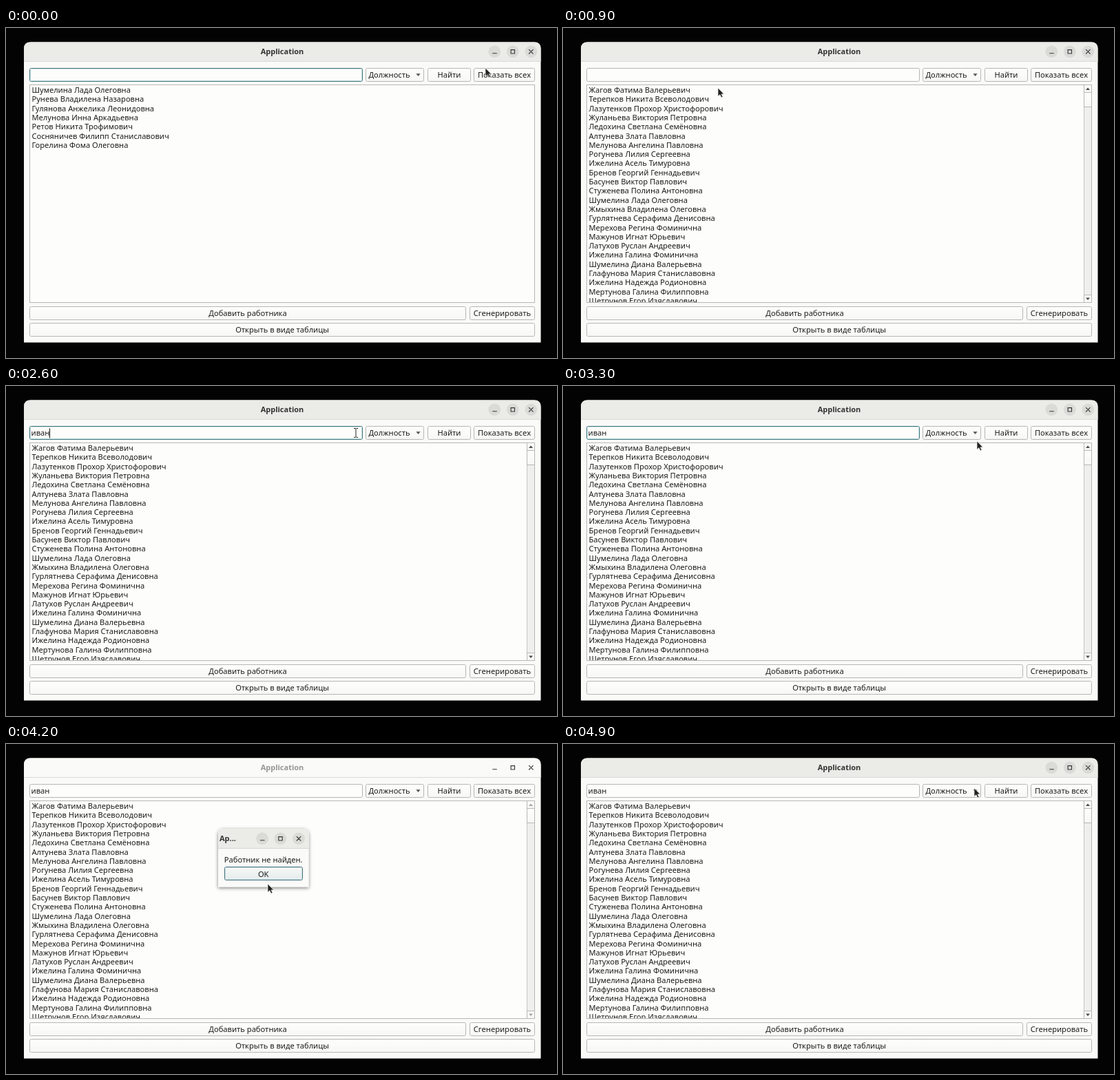
An HTML page for the animation above (5 s loop, 800 by 479 pixels).

```html
<!DOCTYPE html>
<html lang="ru">
<head>
<meta charset="utf-8">
<title>Application</title>
<style>
  html, body { margin: 0; width: 100%; height: 100%; overflow: hidden; background: #030303; }
  svg { display: block; width: 800px; height: 479px; }
  text { font: 11.1px "Noto Sans", "Open Sans", sans-serif; fill: #1c1c1c; white-space: pre; }
  .title { font-size: 11px; font-weight: 700; fill: #333331; }
  .mid { text-anchor: middle; }
  .frame { fill: #fdfdfb; stroke: #b7b8b5; }
  .btn { fill: url(#face); stroke: #b7b8b5; }
  .focus { stroke: #3f7680; }
  .glow { fill: none; stroke: #cfe3e5; }
  .icon { fill: none; stroke: #343432; stroke-width: 1.1; }
  .disc { fill: #dadad7; }
  .off { display: none; }
</style>
</head>
<body>
<svg viewBox="0 0 800 479">
  <defs>
    <linearGradient id="face" x2="0" y2="1">
      <stop offset="0" stop-color="#fefefd"/><stop offset="1" stop-color="#f7f7f5"/>
    </linearGradient>
    <linearGradient id="okFace" x2="0" y2="1">
      <stop offset="0" stop-color="#f7f9f8"/><stop offset="1" stop-color="#e4ebea"/>
    </linearGradient>
    <filter id="shadow" x="-20%" y="-20%" width="140%" height="150%">
      <feDropShadow dx="0" dy="1.5" stdDeviation="2.6" flood-color="#000" flood-opacity=".5"/>
    </filter>
    <clipPath id="listClip"><rect x="35" y="83" width="732" height="315"/></clipPath>
    <g id="controls">
      <g class="discs">
        <circle class="disc" r="8.8" cx="-53"/><circle class="disc" r="8.8" cx="-26.5"/><circle class="disc" r="8.8"/>
      </g>
      <path class="icon" d="M-56 2.5h6.5M-29.2-2.7h5.4v5.4h-5.4zM-3.2-3.2l6.4 6.4M3.2-3.2l-6.4 6.4"/>
    </g>
  </defs>

  <rect width="800" height="479" fill="#030303"/>
  <path d="M26 456.5V30q0-9.5 9.5-9.5h731.500q9.500 0 9.500 9.500v426.500z" fill="#fafaf8"/>
  <path id="bar" d="M26 48.500V30q0-9.500 9.500-9.500h731.500q9.500 0 9.500 9.500v18.500z"/>
  <path d="M26 48.500h750.500" stroke="#dadad7"/>
  <text id="caption" class="title mid" x="401" y="38">Application</text>
  <use id="mainControls" href="#controls" x="762.300" y="34.300"/>

  <rect id="field" class="frame" x="34.500" y="58.500" width="483" height="19" rx="2"/>
  <rect id="fieldGlow" class="glow" x="35.500" y="59.500" width="481" height="17" rx="1"/>
  <text id="typed" x="36.500" y="72"></text>
  <path id="caret" d="M0 61.500v14" stroke="#111"/>

  <g id="buttons"></g>
  <path d="M595.300 66.300h6.400l-3.200 3.600z" fill="#555553"/>

  <rect class="frame" x="34.500" y="82.500" width="733" height="316"/>
  <g id="found" clip-path="url(#listClip)"></g>
  <g id="all">
    <g clip-path="url(#listClip)"></g>
    <rect x="756.500" y="83" width="10.500" height="315" fill="#efefed"/>
    <path d="M756.500 83v315" stroke="#c6c7c4"/>
    <rect class="btn" x="756.500" y="82.500" width="11" height="11"/>
    <rect class="btn" x="756.500" y="93.500" width="11" height="21"/>
    <rect class="btn" x="756.500" y="387.500" width="11" height="11"/>
    <path id="arrows" d="M759 90h6l-3-3.500zM759 391.500h6l-3 3.500z"/>
  </g>

  <g id="dialog">
    <path d="M308 207.500v-76q0-8.500 8.500-8.500h114.500q8.500 0 8.500 8.500v76z" fill="#fafaf8" filter="url(#shadow)"/>
    <path d="M308 151.500v-20q0-8.500 8.500-8.500h114.500q8.500 0 8.500 8.500v20z" fill="#ebebe8"/>
    <path d="M308 151.500h131.500" stroke="#d6d6d3"/>
    <text class="title" x="310" y="141">Ap...</text>
    <use href="#controls" x="425" y="137.300"/>
    <text class="mid" x="373.700" y="171.500">Работник не найден.</text>
    <rect x="317.500" y="178.500" width="113" height="19" rx="2" fill="url(#okFace)" stroke="#47717f"/>
    <rect class="glow" x="318.500" y="179.500" width="111" height="17" rx="1"/>
    <text class="mid" x="373.700" y="192.500">OK</text>
  </g>

  <path id="arrow" d="M0 0v12.200l2.900-2.500 2 4.300 2.100-1-2-4.100h3.700z"
        fill="#222" stroke="#f4f4f4" stroke-width=".7"/>
  <path id="beam" d="M-3-6.500h2.200l.8.800.8-.8H3M0-5.700V5.700M-3 6.500h2.200L0 5.700l.8.800H3" fill="none" stroke="#222"/>
</svg>

<script>
const LOOP = 5000, STEP = 100;
const $ = id => document.getElementById(id);

const foundNames = `Шумелина Лада Олеговна
Рунева Владилена Назаровна
Гулянова Анжелика Леонидовна
Мелунова Инна Аркадьевна
Ретов Никита Трофимович
Сосняничев Филипп Станиславович
Горелина Фома Олеговна`;

const allNames = `Жагов Фатима Валерьевич
Терепков Никита Всеволодович
Лазутенков Прохор Христофорович
Жуланьева Виктория Петровна
Ледохина Светлана Семёновна
Алтунева Злата Павловна
Мелунова Ангелина Павловна
Рогунева Лилия Сергеевна
Ижелина Асель Тимуровна
Бренов Георгий Геннадьевич
Басунев Виктор Павлович
Стуженева Полина Антоновна
Шумелина Лада Олеговна
Жмыхина Владилена Олеговна
Гурлятнева Серафима Денисовна
Мерехова Регина Фоминична
Мажунов Игнат Юрьевич
Латухов Руслан Андреевич
Ижелина Галина Фоминична
Шумелина Диана Валерьевна
Глафунова Мария Станиславовна
Ижелина Надежда Родионовна
Мертунова Галина Филипповна
Щетрунов Егор Изяславович`;

const rows = names => names.split('\n')
  .map((name, i) => `<text x="37.5" y="${(94 + i * 13.3).toFixed(1)}">${name}</text>`).join('');
$('found').innerHTML = rows(foundNames);
$('all').firstElementChild.innerHTML = rows(allNames);

// left, top, right, label, label centre
$('buttons').innerHTML = [
  [522, 58, 607, 'Должность', 556.5],
  [612, 58, 675, 'Найти'],
  [679, 58, 768, 'Показать всех'],
  [34, 404, 668, 'Добавить работника'],
  [673, 404, 768, 'Сгенерировать'],
  [34, 428, 768, 'Открыть в виде таблицы']
].map(([x, y, r, label, mid = (x + r) / 2]) =>
  `<rect class="btn" x="${x + .5}" y="${y + .5}" width="${r - x - 1}" height="19" rx="2"/>
   <text class="mid" x="${mid}" y="${y + 14}">${label}</text>`).join('');

// time, x, y; a fourth value marks the text cursor
const pointer = [
  [0, 696, 58], [100, 698, 61], [200, 701, 66], [400, 700, 70], [500, 684, 92], [600, 650, 119],
  [700, 540, 110], [800, 380, 98], [900, 225, 87], [1000, 120, 75, 1], [1100, 84, 71, 1], [1200, 75, 70.5, 1],
  [2500, 330, 66, 1], [2600, 508, 68, 1], [3100, 560, 96], [3200, 592, 104], [3300, 601, 80],
  [3500, 614, 72], [3600, 629, 65], [3700, 632, 63], [3900, 588, 90], [4000, 505, 140],
  [4100, 410, 186], [4200, 380, 203], [4300, 378, 190], [4500, 377, 158], [4600, 377, 119],
  [4700, 628, 64], [4900, 597, 64]
];
const typing = [[0, ''], [2300, 'и'], [2500, 'ива'], [2600, 'иван']];
const activity = [[0, 1], [3700, .8], [3800, .45], [3900, .1], [4000, 0], [4400, .4], [4500, .8], [4600, 1]];

const at = (keys, t) => keys.findLast(k => k[0] <= t);
const within = (t, a, b) => t >= a && t < b;
const show = (id, on) => $(id).classList.toggle('off', !on);
const mix = (a, b, k) => `rgb(${a.map((v, i) => Math.round(v + (b[i] - v) * k))})`;

function draw(t) {
  const [, x, y, beam] = at(pointer, t);
  show('arrow', !beam);
  show('beam', beam);
  $(beam ? 'beam' : 'arrow').setAttribute('transform', `translate(${x} ${y})`);

  const focused = t < 200 || within(t, 1200, 3600);
  $('field').classList.toggle('focus', focused);
  show('fieldGlow', focused);

  const typed = $('typed');
  typed.textContent = at(typing, t)[1];
  const end = typed.textContent ? typed.getComputedTextLength() : 0;
  $('caret').setAttribute('transform', `translate(${Math.round(36 + end) + .5})`);
  show('caret', within(t, 1200, 1700) || within(t, 2300, 3100));

  show('found', t < 300);
  show('all', t >= 300);
  show('dialog', within(t, 3700, 4400));

  const active = at(activity, t)[1];
  $('bar').setAttribute('fill', mix([250, 250, 248], [235, 235, 232], active));
  $('caption').style.fill = mix([150, 150, 148], [51, 51, 49], Math.max(0, active * 2 - 1));
  $('mainControls').style.setProperty('--disc', active);
  $('arrows').setAttribute('fill', mix([165, 165, 163], [75, 75, 73], Math.max(0, active * 2 - 1)));
}

// custom properties pass into <use> copies, so each window fades its own discs
document.querySelector('.discs').style.opacity = 'var(--disc, 1)';

const start = performance.now();
function tick() {
  const t = (performance.now() - start) % LOOP;
  draw(Math.floor(t / STEP) * STEP);
  requestAnimationFrame(tick);
}
tick();
</script>
</body>
</html>
```
